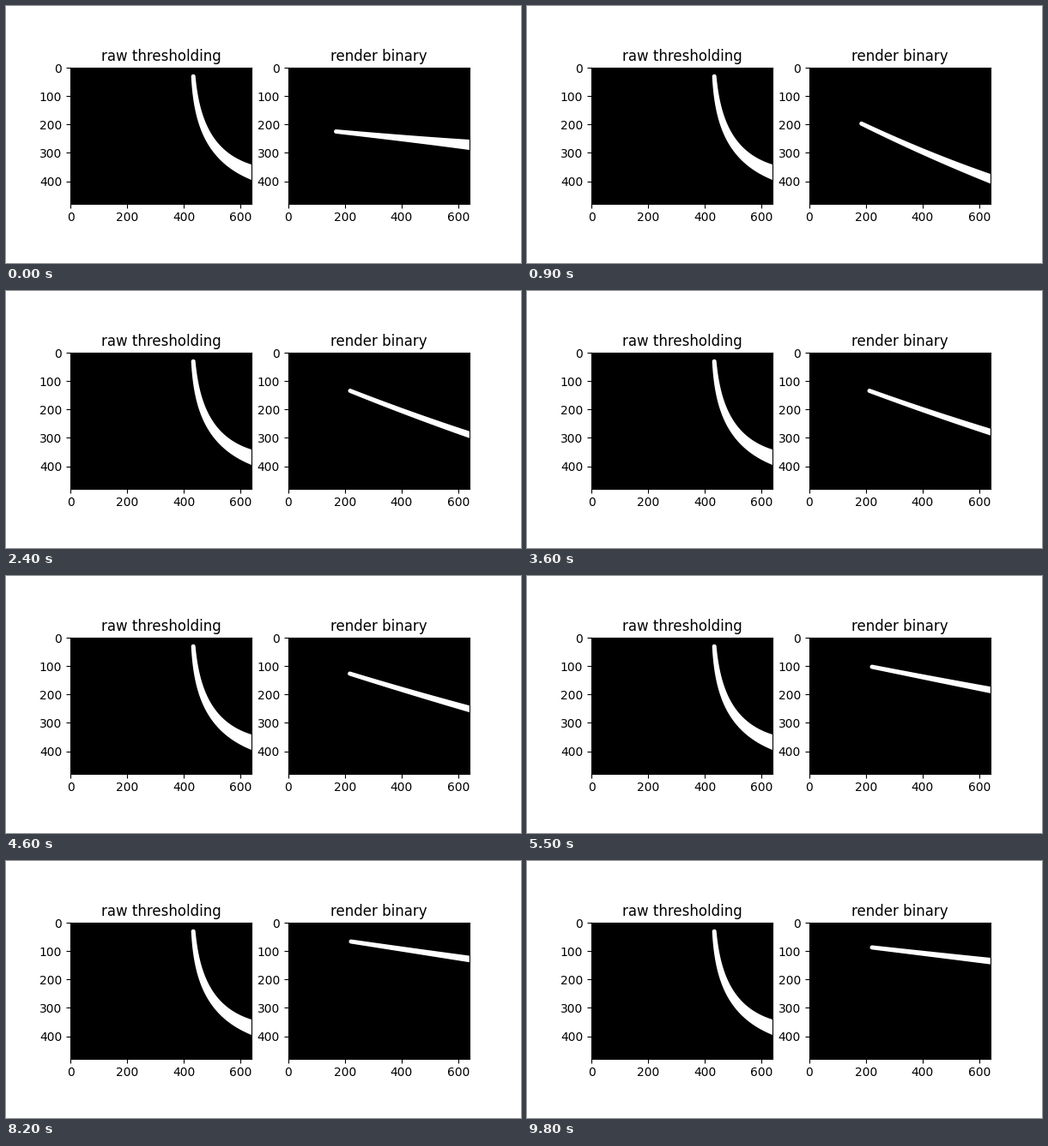
These frames come from a looping animation (600 by 300 pixels, 9900 ms). A matplotlib script:

```python
import numpy as np
import matplotlib.pyplot as plt
from matplotlib.animation import FuncAnimation
from matplotlib.patches import Polygon

FRAMES, STEP_MS = 99, 100
UNIT = 640 / 211.364      # image units per stage pixel
TOP = 72.24               # stage y of both panels' upper edge
LEFT_X, RIGHT_X = 75, 328.64
BORDER = 540              # stage x where the rendered tube leaves its panel


def glide(frame, *keys):
    """Ease smoothly through (frame, value) keys, holding both ends."""
    value = keys[0][1]
    for (f0, v0), (f1, v1) in zip(keys, keys[1:]):
        s = min(max((frame - f0) / (f1 - f0), 0), 1)
        value += (v1 - v0) * s * s * (3 - 2 * s)
    return value


def bezier(points, t):
    """Evaluate a Bezier curve of any degree by repeated blending."""
    layer = [np.outer(np.ones_like(t), p) for p in points]
    t = t[:, None]
    while len(layer) > 1:
        layer = [(1 - t) * a + t * b for a, b in zip(layer, layer[1:])]
    return layer[0]


def tube(points, near, far, panel_x):
    """Outline of a round-tipped tube that widens from near to far."""
    t = np.linspace(0, 1.06, 80)
    centre = bezier(points, t)
    along = np.gradient(centre, axis=0)
    along /= np.hypot(*along.T)[:, None]
    normal = np.column_stack((-along[:, 1], along[:, 0]))
    half = near / 2 * (far / near) ** t
    offset = normal * half[:, None]
    a = np.linspace(0, np.pi, 14)[:, None]
    cap = centre[0] + half[0] * (-np.cos(a) * normal[0] - np.sin(a) * along[0])
    outline = np.vstack((cap, centre + offset, (centre - offset)[::-1]))
    return (outline - (panel_x, TOP)) * UNIT - 0.5


def rendered(frame):
    x = glide(frame, (0, 384.5), (24, 401), (36, 399), (55, 402))
    y = glide(frame, (2, 146.5), (21, 116.5), (40, 116.5), (62, 102.7), (82, 94), (98, 100.9))
    end = glide(frame, (0, 162), (10.5, 204), (21, 168), (38, 164.5),
                (67, 114.4), (82, 114.4), (90, 121), (98, 116.8))
    width = glide(frame, (0, 12), (24, 7.6))
    sag = 2 * ((end - y) / 64) ** 3   # steeper poses bend more
    mid = ((x + BORDER) / 2, (y + end) / 2 + 2 * sag)
    return tube([(x, y), mid, (BORDER, end)], 4.9, width, RIGHT_X)


def panel(ax, title, outline):
    ax.imshow(np.zeros((480, 640)), cmap="gray", vmin=0, vmax=1)
    ax.set_xticks(range(0, 601, 200))
    ax.set_yticks(range(0, 401, 100))
    ax.set_title(title)
    return ax.add_patch(Polygon(outline, facecolor="white", edgecolor="none"))


fig, (left, right) = plt.subplots(1, 2, figsize=(6, 3), dpi=100)
panel(left, "raw thresholding",
      tube([(218.2, 82.2), (222, 134), (236, 176), (286.4, 194)], 5, 17, LEFT_X))
moving = panel(right, "render binary", rendered(0))


def update(frame):
    moving.set_xy(rendered(frame))
    return (moving,)


anim = FuncAnimation(fig, update, frames=FRAMES, interval=STEP_MS, repeat=True)
plt.show()
```
